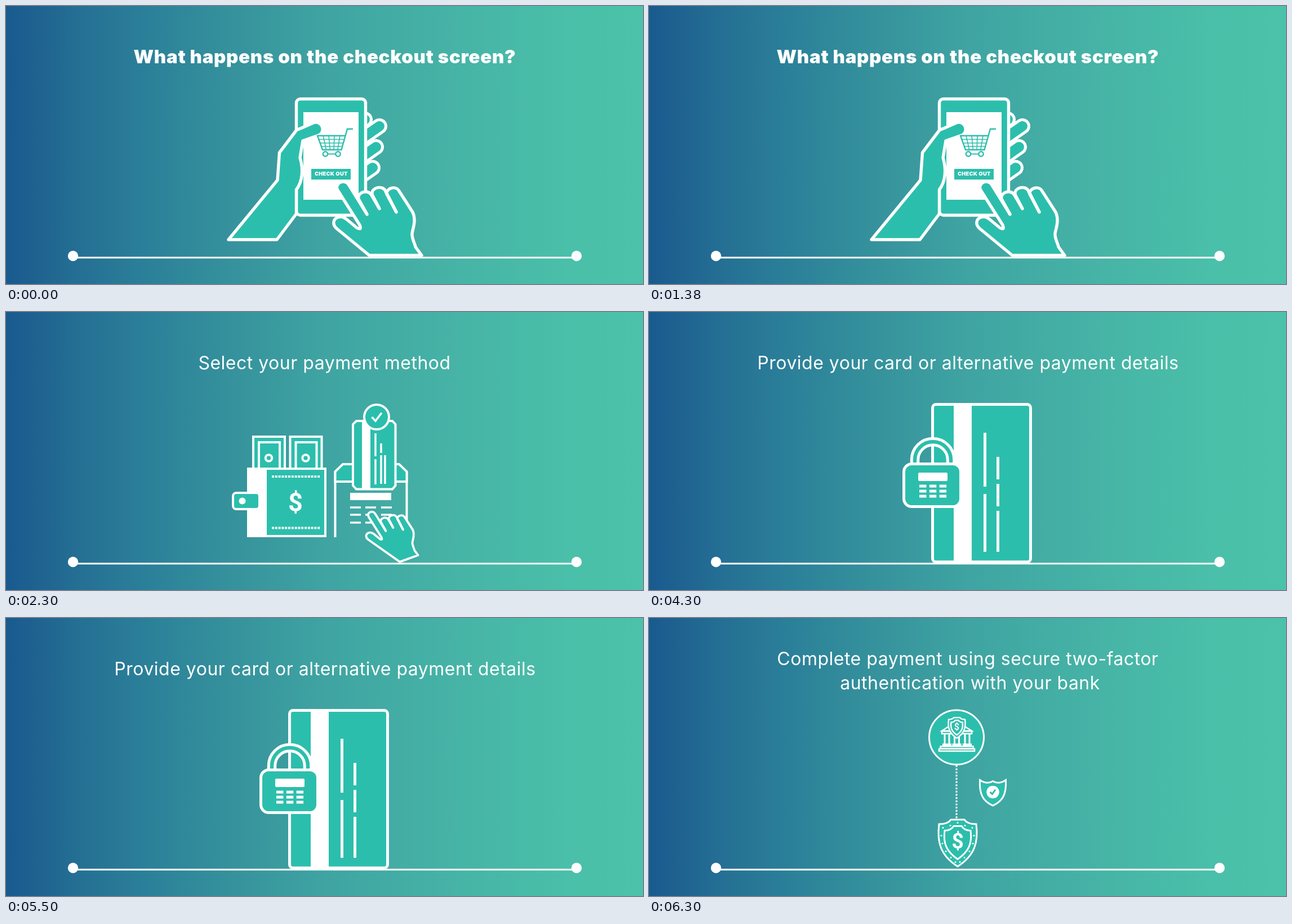
Animation, 1131 px wide and 495 px high, one loop 8.3 s. Source, as an HTML page with a canvas:

```html
<!DOCTYPE html>
<html lang="en">
<head>
<meta charset="utf-8">
<title>Checkout steps</title>
<style>
html, body { margin: 0; width: 100%; height: 100%; overflow: hidden; background: #3ea2a1; }
canvas { display: block; }
</style>
</head>
<body>
<canvas id="stage" width="1131" height="495"></canvas>
<script>
const ctx = document.getElementById('stage').getContext('2d');
const W = 1131, H = 495, LOOP = 8300;
const TEAL = '#2cbeac', WHITE = '#fff';

const sky = ctx.createLinearGradient(0, 0, W, 0);
[[0, '#195a8f'], [0.04, '#1e6190'], [0.12, '#257094'], [0.22, '#2b8099'], [0.35, '#35919c'],
 [0.5, '#3fa4a2'], [0.7, '#46b3a6'], [0.88, '#4abfa9'], [1, '#4bc2a9']]
  .forEach(([at, color]) => sky.addColorStop(at, color));

function shape(d, width, fill = TEAL, stroke = WHITE) {
  const path = new Path2D(d);
  if (fill) { ctx.fillStyle = fill; ctx.fill(path); }
  if (width) { ctx.lineWidth = width; ctx.strokeStyle = stroke; ctx.stroke(path); }
}

const line = (d, width, color = WHITE) => shape(d, width, null, color);

function box(x, y, w, h, fill = WHITE, width = 0, r = 0) {
  ctx.beginPath();
  ctx.roundRect(x, y, w, h, r);
  if (fill) { ctx.fillStyle = fill; ctx.fill(); }
  if (width) { ctx.lineWidth = width; ctx.strokeStyle = WHITE; ctx.stroke(); }
}

function disc(x, y, r, fill = WHITE, width = 0, stroke = WHITE) {
  ctx.beginPath();
  ctx.arc(x, y, r, 0, Math.PI * 2);
  if (fill) { ctx.fillStyle = fill; ctx.fill(); }
  if (width) { ctx.lineWidth = width; ctx.strokeStyle = stroke; ctx.stroke(); }
}

function text(str, x, y, font, spacing = 0) {
  ctx.font = font;
  ctx.letterSpacing = spacing + 'px';
  ctx.textAlign = 'center';
  ctx.fillStyle = WHITE;
  ctx.fillText(str, x, y);
}

const caption = (str, x, y) => text(str, x, y, '400 32px Inter, sans-serif', 0.5);
const dollar = (x, y, size) => text('$', x, y, `700 ${size}px Roboto, sans-serif`);

function dashed(d, width, dash) {
  ctx.setLineDash(dash);
  line(d, width);
  ctx.setLineDash([]);
}

function backdrop() {
  ctx.fillStyle = sky;
  ctx.fillRect(0, 0, W, H);
  line('M119 448H1013', 3);
  disc(119, 445, 9.2);
  disc(1013, 445, 9.2);
}

// Pointing hand; (x, y) is the lower corner of the wrist.
function pointer(x, y, width) {
  ctx.lineJoin = 'round';
  shape(`M${x} ${y}L588 397C579 390 580 379 590 376C597 374 601 377 605 380
    L623 395Q632 400 628 390L589 328C582 316 601 306 609 319L641 371L626 344
    C622 332 643 325 649 337L663 361L650 336C648 323 667 319 673 328L693 367L676 335
    C675 324 691 320 697 328L722 367C729 382 722 397 721 405C720 414 727 425 727 429
    L738 444Z`, width);
  line('M641 371L626 344M663 361L650 336M693 367L674 330', width);
  ctx.lineJoin = 'miter';
}

function cart() {
  line('M616 219H606L595.5 256H562L553 231H603', 2.4, TEAL);
  line('M555 237.5H601M557 244H599M559 250H597', 1.6, TEAL);
  for (let i = 1; i < 5; i++) line(`M${553 + i * 10} 231L${562 + i * 6.7} 256`, 1.6, TEAL);
  line('M571 263.5H585', 2, TEAL);
  disc(567, 263.5, 4.2, WHITE, 2.4, TEAL);
  disc(589.5, 263.5, 4.2, WHITE, 2.4, TEAL);
}

function checkout() {
  text('What happens on the checkout screen?', 566, 102, '900 33px Inter, sans-serif', 0.7);

  ctx.lineCap = 'round';
  [[637, 202], [663, 214], [657, 251], [651, 288]].forEach(([x, y]) => {
    const finger = `M${x} ${y}l-30 21`;
    line(finger, 28);
    line(finger, 18, TEAL);
  });
  ctx.lineCap = 'butt';

  box(515.5, 165.5, 123, 207, TEAL, 5.4, 7);
  box(528, 189, 98, 156);
  ctx.lineJoin = 'round';
  shape(`M395 416L482 310L485.5 261L515 222Q517 220 523 218L547 207.5
    A12.3 12.3 0 0 1 557 229.5L527 240L522 270C528 290 527 312 515.5 327
    V370L481 416Z`, 5.4);
  ctx.lineJoin = 'miter';
  cart();
  box(542, 290, 70, 19, TEAL);
  text('CHECK OUT', 577.3, 302, '900 9.5px Inter, sans-serif', 0.2);
  pointer(645, 444, 5.4);
}

function bill(x) {
  box(x, 222, 56, 70, TEAL, 4);
  box(x + 10, 232, 37, 60, TEAL, 4);
  disc(x + 27.5, 260, 5.7, null, 4);
}

function wallet() {
  bill(439);
  bill(504.5);
  box(430, 279, 137, 120, TEAL, 4);
  box(428, 277, 35, 124);
  box(403, 322, 47, 29, TEAL, 4, 6);
  disc(419.5, 336.5, 6);
  dashed('M472 293H557M472 384.5H557', 4, [4, 1.8]);
  dollar(514, 353.5, 45);
}

function terminal() {
  line('M584.5 285V401M711.5 285V401', 4);
  shape('M584.5 302V284L598 271H698L711.5 284V302Z', 4);
  shape('M622 194H686L691.5 200V309L686 315.5H622L616 309V200Z', 4);
  box(632, 194, 15, 121);
  line('M656 216V257M656 262V307M666 234V251M666 255V306M673 255V306', 3.5);
  disc(658, 187, 22, TEAL, 4);
  line('M649.5 187L656 194L667 179.5', 3.5);
  box(611, 322, 73, 13);
  [348, 361, 375].forEach(y => line(`M611 ${y}h19m8 0h19m9 0h19`, 3.5));
}

function method() {
  caption('Select your payment method', 565.5, 102);
  wallet();
  terminal();
  ctx.save();
  ctx.translate(296.2, 171.1);
  ctx.scale(0.59, 0.59);
  pointer(683, 464, 6.4);
  ctx.restore();
}

function details() {
  caption('Provide your card or alternative payment details', 566.5, 102);
  box(503.5, 164.5, 174, 280.5, TEAL, 5, 6);
  box(541, 164, 32, 281);
  line('M596.5 215V311M596.5 324V427M619.5 258V298M619.5 306V346M619.5 354V427', 5);

  const shackle = 'M472 272V263A32 32 0 0 1 536 263V272';
  line(shackle, 16.5);
  line(shackle, 6.5, TEAL);
  box(452.5, 270.5, 101, 76, TEAL, 5, 14);
  box(478, 286, 52, 15, WHITE, 0, 2);
  for (let i = 0; i < 9; i++) box(480 + (i % 3) * 17.8, 307.5 + Math.floor(i / 3) * 9, 12.5, 5);
}

// Shield with its top centre at the current origin.
function shield(width) {
  shape(`M-12 0.5H12Q17 8.5 33 8.5C37 40 31 64 0 84C-31 64 -37 40 -33 8.5Q-17 8.5 -12 0.5Z`, width);
  shape(`M-7 12H7Q12 20 23 20C26 43 20 57 0 71C-20 57 -26 43 -23 20Q-12 20 -7 12Z`, width);
  dollar(0, 51, 37);
}

function bank() {
  disc(546, 212.5, 48.5, TEAL, 3);
  shape('M520 201L546 184L573 201Z', 2.5);
  box(520, 201.5, 53, 4.5, TEAL, 2.5);
  [529, 546.5, 565].forEach(x => {
    line(`M${x - 4} 206V225M${x + 4} 206V225`, 3);
    box(x - 8, 223.5, 16, 5);
  });
  box(517.5, 228.5, 58, 4, TEAL, 2.5);
  box(515, 233, 63, 4, TEAL, 2.5);
  ctx.save();
  ctx.translate(546.5, 177);
  ctx.scale(0.44, 0.44);
  shield(5.5);
  ctx.restore();
}

function secure() {
  caption('Complete payment using secure two-factor', 566, 84);
  caption('authentication with your bank', 570, 127);
  dashed('M546 262V357', 3, [3.2, 2.5]);
  bank();

  ctx.save();
  ctx.translate(548, 358.5);
  shield(3);
  [[0, 6], [13, 11], [26, 15], [29, 29], [27, 43], [21, 57], [12, 68], [4, 76]].forEach(([x, y]) => {
    disc(x, y, 1.5);
    if (x) disc(-x, y, 1.5);
  });
  ctx.restore();

  shape(`M587.5 288.5Q600 297 610.5 290.5Q621 297 633.5 288.5
    C635 315 627 327 610.5 334C594 327 586 315 587.5 288.5Z`, 3);
  disc(610.5, 310, 11.3);
  line('M605.5 310L609.5 313.5L615 305.5', 3, TEAL);
}

const scenes = [[2300, checkout], [4300, method], [6300, details], [LOOP, secure]];
const start = performance.now();

function frame() {
  const t = (performance.now() - start) % LOOP;
  backdrop();
  scenes.find(([end]) => t < end)[1]();
  requestAnimationFrame(frame);
}
frame();
</script>
</body>
</html>
```
